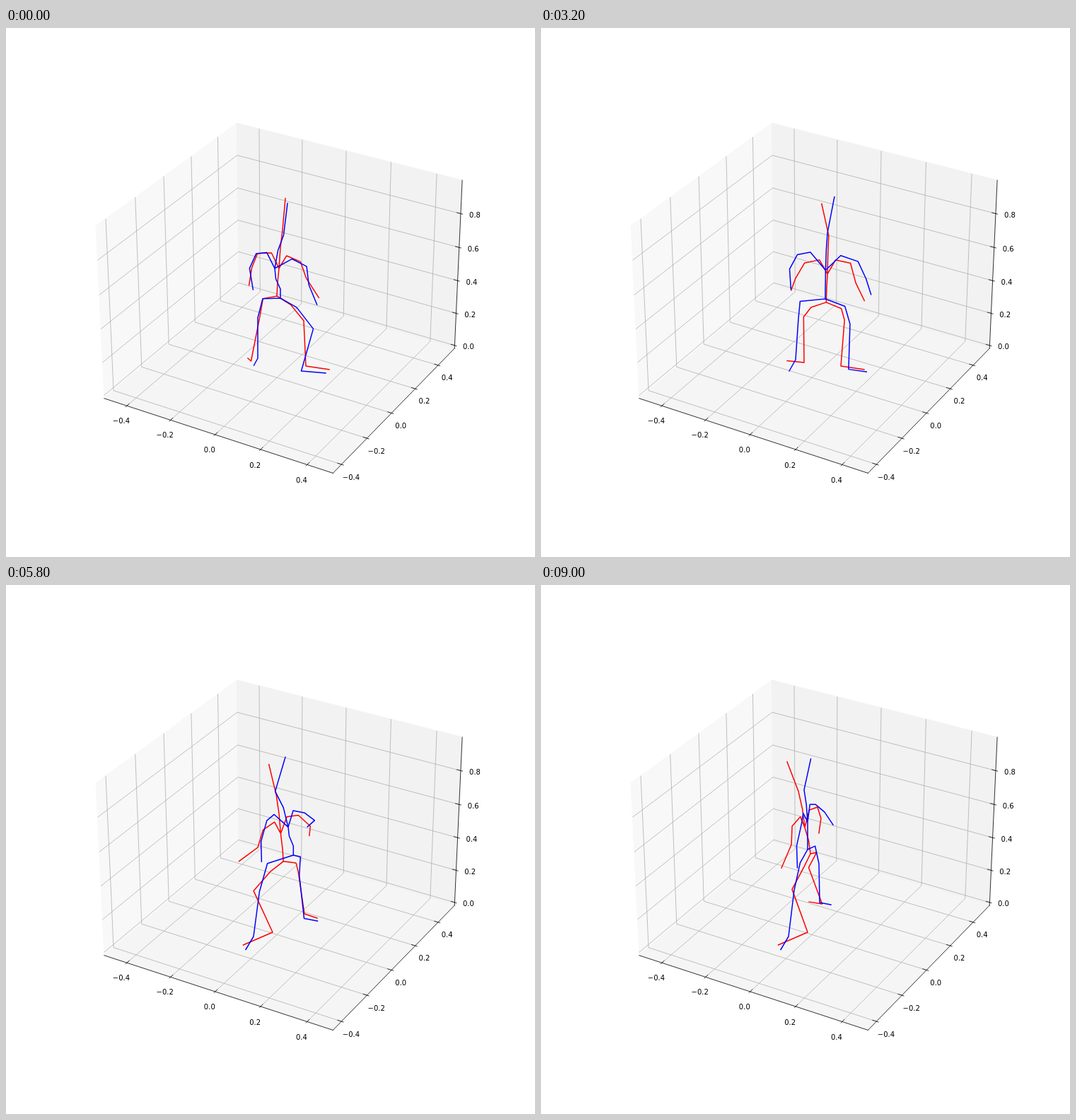
An HTML page for the animation above (9.2 s loop, 748 px wide and 748 px high).

```html
<!DOCTYPE html>
<html lang="en">
<head>
<meta charset="utf-8">
<title>Two moving skeletons</title>
<style>
  html, body { margin: 0; width: 100%; height: 100%; overflow: hidden; background: #fff; }
  svg { display: block; width: 748px; height: 748px; }
  text { font: 10px "DejaVu Sans", sans-serif; text-anchor: middle; }
  .grid { fill: none; stroke: #b0b0b0; stroke-width: .8; }
  .axis { fill: none; stroke: #000; stroke-width: .8; stroke-linecap: square; }
  .limb { fill: none; stroke-width: 1.5; stroke-linecap: square; stroke-linejoin: round; }
</style>
</head>
<body>
<svg id="stage" viewBox="0 0 748 748"></svg>
<script>
const LOOP = 9200, STEP = 200, END = 9;
const stage = document.getElementById('stage');

function add(tag, attrs, text) {
  const el = document.createElementNS('http://www.w3.org/2000/svg', tag);
  for (const k in attrs) el.setAttribute(k, attrs[k]);
  if (text) el.textContent = text;
  return stage.appendChild(el);
}
const path = pts => 'M' + pts.map(p => p.map(n => n.toFixed(2)).join(' ')).join('L');

// Perspective view of the box: elevation 30, azimuth -60, distance 10
const S = Math.sqrt(3) / 2, W = .5952, H = .4464;
function project([x, y, z]) {
  const depth = 10 - (S / 2 * x - .75 * y + z / 2);
  const u = S * x + y / 2;
  const v = -x / 4 + S / 2 * y + S * z;
  return [391.1 + 3113.3 * u / depth, 370 - 3113.3 * v / depth];
}
const draw = (cls, ...pts) => add('path', { class: cls, d: path(pts.map(project)) });
const pane = (color, ...pts) => add('path', { fill: color, stroke: color, d: path(pts.map(project)) + 'Z' });

function label(value, at, drop) {
  const [x, y] = project(at);
  add('text', { x, y: y + drop }, value.toFixed(1).replace('-', '\u2212'));
}

function drawBox() {
  pane('#f8f8f8', [-W, -W, -H], [-W, W, -H], [-W, W, H], [-W, -W, H]);
  pane('#f2f2f2', [-W, W, -H], [W, W, -H], [W, W, H], [-W, W, H]);
  pane('#f5f5f5', [-W, -W, -H], [W, -W, -H], [W, W, -H], [-W, W, -H]);
  const sides = [-.4, -.2, 0, .2, .4], heights = [0, .2, .4, .6, .8];
  const X = v => 1.173 * v - .0025, Y = v => 1.1755 * v - .0486, Z = v => .8813 * v - .43;
  sides.map(X).forEach(x => draw('grid', [x, -W, -H], [x, W, -H], [x, W, H]));
  sides.map(Y).forEach(y => draw('grid', [W, y, -H], [-W, y, -H], [-W, y, H]));
  heights.map(Z).forEach(z => draw('grid', [-W, -W, z], [-W, W, z], [W, W, z]));

  draw('axis', [-W, -W, -H], [W, -W, -H]);
  draw('axis', [W, -W, -H], [W, W, -H]);
  draw('axis', [W, W, -H], [W, W, H]);
  const inner = W - .019, outer = W + .0095, far = W + .0485, low = -H - .0485;
  for (const v of sides) {
    draw('axis', [X(v), -inner, -H], [X(v), -outer, -H]);
    label(v, [X(v), -far, low], 5);
    draw('axis', [inner, Y(v), -H], [outer, Y(v), -H]);
    label(v, [far, Y(v), low], 4.7);
  }
  for (const v of heights) {
    draw('axis', [inner, W, Z(v)], [outer, W, Z(v)]);
    label(v, [far, far, Z(v)], 8);
  }
}

// Smooth curve through values spread evenly over the motion
function curve(vals, t) {
  const n = vals.length - 1;
  if (!n) return vals[0];
  const i = Math.min(n - 1, Math.floor(t / END * n)), s = t / END * n - i;
  const at = k => vals[Math.max(0, Math.min(n, k))];
  const slope = k => (at(k + 1) - at(k - 1)) / (k > 0 && k < n ? 2 : 1);
  const a = at(i), b = at(i + 1);
  return a + (b - a) * s * s * (3 - 2 * s) + s * (1 - s) * (slope(i) * (1 - s) - slope(i + 1) * s);
}

// A foot rests at [ankle, toe] and eases to a new place in each step [from, to, place]
function foot({ rest, steps }, t) {
  let place = rest;
  for (const [from, to, next] of steps) {
    const s = Math.max(0, Math.min(1, (t - from) / (to - from)));
    place = place.map((v, i) => v + (next[i] - v) * s * s * (3 - 2 * s));
  }
  return place;
}

// Lengths in px, yaw in degrees, times in seconds
const red = {
  color: '#f00',
  pelvis: [[383, 395, 404, 395, 382, 381], [379, 383, 389, 391, 388.5, 380]],
  lean: [3, 4, 1, -3, -6, -8],
  rise: [39, 40, 37],
  back: [[.3, 18]],
  head: [[9, -10, -8, -15, -22, -25], [-99, -99, -93]],
  neck: [5, 3, 1, -5, -9, -9], neckAt: .55,
  shoulders: { yaw: [-21, -14.5, 5, 36, 47, 56.5], half: [32.5], mid: [[0], [-15.5]] },
  collar: { share: .35, mid: [0, -4.5] },
  hips: { yaw: [-24, -17, 0, 28, 51, 66], half: [21.5], mid: [[0], [8]] },
  arms: [
    { elbow: [[-8, -13, -7, -1], [20, 22, 25, 26]], hand: [[-4, -5, -27, -14], [25, 21, 12, 26, 33]] },
    { elbow: [[8, 7, 17, 5], [23, 28, 15, 16]], hand: [[18, 13, -2, -3], [28, 26, 13, 21]] }
  ],
  legs: [
    { tilt: [12.5, 14, -23, -26, -22], shin: [64.5],
      rest: [346.5, 471, 342, 467],
      steps: [[2, 3.2, [372, 473, 348, 470.5]], [3.2, 4.8, [377, 491, 335.5, 509]]] },
    { tilt: [-3, 7, -1, -14, -19], shin: [64, 64, 66, 56, 55],
      rest: [424, 478, 457, 483],
      steps: [[4.8, 5.8, [422, 465, 440, 471]], [5.8, 7.4, [397.5, 451, 379, 448]]] }
  ]
};

const blue = {
  color: '#00f',
  pelvis: [[388, 384.5, 406, 409, 391, 377], [382, 378, 384, 383, 377.5, 374]],
  lean: [-8, 3.5, -1, -7, -6, 0],
  rise: [42, 40, 39],
  back: [[.8, 27], [0, 13]],
  head: [[18, 28, 8, -4, 1, 4.5], [-92, -100, -104, -101, -91, -89]],
  neck: [12.5, 13, -1, -19, -8, -5], neckAt: .51,
  shoulders: {
    yaw: [-27, -21.5, -9, 13, 57, 69], half: [40, 43.5, 43, 31, 24, 26.5],
    mid: [[9.5, 10.5, 1, -3, -3, 1.5], [-12, -12, -18, -16, -9.5, -12.5]]
  },
  collar: { share: .5, mid: [-3, -6] },
  hips: {
    yaw: [-27, -21.5, -9, 13, 57, 66], half: [27, 32, 32, 26.5, 21.5, 26],
    mid: [[-1, 7, -7, -14, -7, 0], [7]]
  },
  arms: [
    { elbow: [[-9.5, -11, -8, -7.5], [21, 20, 30, 34]], hand: [[5, 1, 1], [30, 28, 31]] },
    { elbow: [[3, 11, 14, 13], [26, 25, 10, 11]], hand: [[11.5, 14.5, 4, -13, 10, 12], [28, 24, 21, 9, 14, 18]] }
  ],
  legs: [
    { tilt: [0, 1, 8, 8, 8], shin: [57, 56, 60, 66, 66],
      rest: [356, 467, 350.5, 477],
      steps: [[0, 1.8, [352.5, 463, 345, 474]], [1.8, 3.2, [360, 469, 351, 485]], [3.2, 4.9, [350, 497, 339, 515.5]]] },
    { tilt: [17, 7, -4, -7, -1], shin: [62, 63, 65, 58, 55],
      rest: [417.5, 485, 452, 488],
      steps: [[0, 1.8, [434, 482, 469, 485]], [1.8, 4.2, [435.5, 483, 455, 487]],
        [4.6, 7.4, [400, 454, 418, 457]], [7.4, 9, [394, 449, 410, 452]]] }
  ]
};

const plus = (p, [x, y]) => [p[0] + x, p[1] + y];

function pose(body, t) {
  const val = c => curve(c, t);
  const point = ([x, y]) => [val(x), val(y)];
  // A level bar turning about the vertical, seen from 30 degrees above
  const bar = ({ yaw, half }) => {
    const a = val(yaw) * Math.PI / 180, r = val(half);
    return [r * Math.cos(a), -r / 2 * Math.sin(a)];
  };

  const pelvis = point(body.pelvis), lean = val(body.lean);
  const chest = plus(pelvis, [lean, -val(body.rise)]);
  const head = point(body.head), neck = val(body.neck);
  const spine = [
    plus(chest, head),
    plus(chest, [neck, head[1] * body.neckAt]),
    plus(chest, [neck * .37, head[1] * .28]),
    chest,
    ...body.back.map(([share, up]) => plus(pelvis, [lean * share, -up])),
    pelvis
  ];

  const arms = body.arms.map((arm, i) => {
    const side = i * 2 - 1, [x, y] = bar(body.shoulders), k = side * body.collar.share;
    const mid = plus(chest, point(body.shoulders.mid));
    const shoulder = plus(mid, [side * x, side * y]);
    const collar = plus(plus(mid, body.collar.mid), [k * x, k * y]);
    const elbow = plus(shoulder, point(arm.elbow));
    return [chest, collar, shoulder, elbow, plus(elbow, point(arm.hand))];
  });

  const legs = body.legs.map((leg, i) => {
    const side = i * 2 - 1, [x, y] = bar(body.hips);
    const hip = plus(plus(pelvis, point(body.hips.mid)), [side * x, side * y]);
    const [ax, ay, tx, ty] = foot(leg, t);
    const tilt = val(leg.tilt), shin = val(leg.shin);
    const knee = [ax + tilt, ay - Math.sqrt(shin * shin - tilt * tilt)];
    return [pelvis, hip, knee, [ax, ay], [tx, ty]];
  });
  return [spine, ...arms, ...legs];
}

drawBox();
for (const body of [red, blue]) body.path = add('path', { class: 'limb', stroke: body.color });

const start = performance.now();
function tick() {
  const t = (performance.now() - start) % LOOP;
  const seconds = Math.floor(t / STEP) * STEP / 1000;
  for (const body of [red, blue]) body.path.setAttribute('d', pose(body, seconds).map(path).join(''));
  requestAnimationFrame(tick);
}
tick();
</script>
</body>
</html>
```
